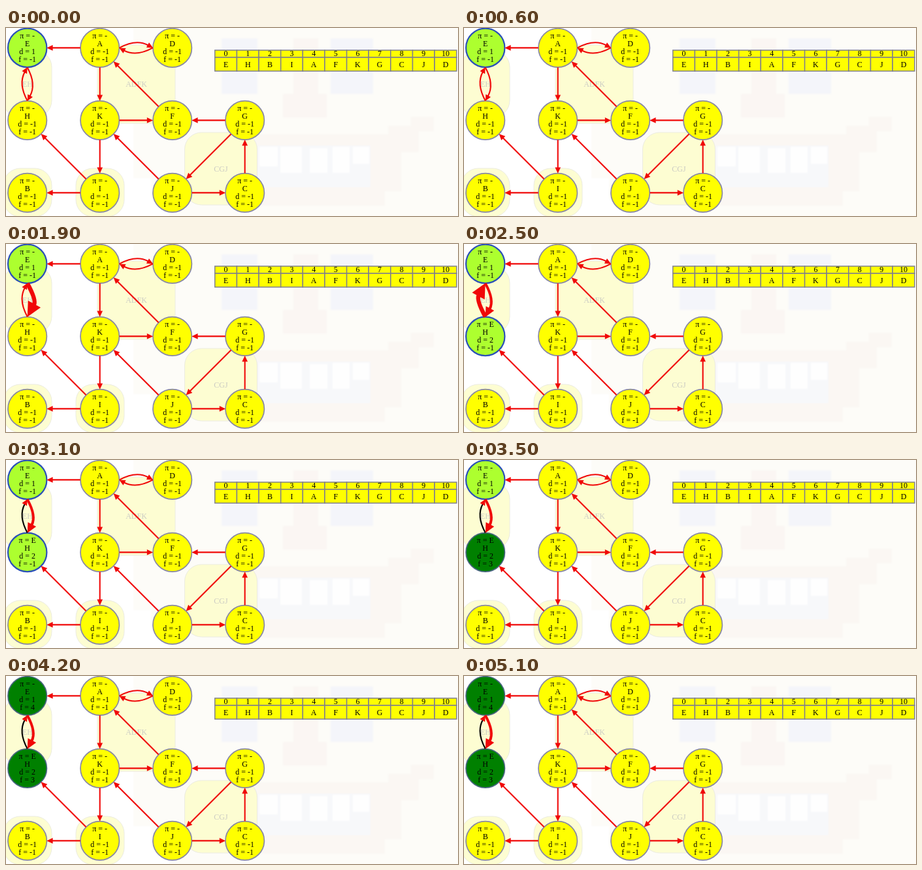
Recreate the animation shown at these times as an HTML page. Size 692 px wide and 288 px high, loop 5.2 s.

```html
<!DOCTYPE html>
<html lang="en">
<head>
<meta charset="utf-8">
<title>Depth-first search</title>
<style>
  html, body { margin: 0; width: 100%; height: 100%; overflow: hidden; background: #fff; }
  svg { display: block; width: 692px; height: 288px; }
  text { font: 12px "Liberation Serif", "Times New Roman", serif; text-anchor: middle; white-space: pre; }
  .group rect { fill: #fdfdd2; stroke: #ecece0; }
  .group text { fill: #ccccc4; }
  .node circle { fill: #ff0; stroke: #8888a4; stroke-width: 1.7; }
  .node.open circle { fill: #adff2f; stroke: #2b50b8; stroke-width: 2.2; }
  .node.done circle { fill: #008000; stroke: #48657f; }
  .edge { fill: none; stroke: #f00808; }
  .head { fill: #f00808; }
  .cell { fill: #ff0; stroke: #80808c; stroke-width: 1.5; }
</style>
</head>
<body>
<svg id="stage" viewBox="0 0 692 288">
  <defs><filter id="soft"><feGaussianBlur stdDeviation="1.2"/></filter></defs>
  <g filter="url(#soft)">
    <path fill="#fdfcf8" d="M195 0H700V296H250V262H222V230H195Z"/>
    <path fill="#f4f5fa" d="M330 16H385V101H330ZM497 16H562V101H497Z"/>
    <path fill="#fbf6f3" d="M440 16H478V101H491V137H424V101H440Z"/>
    <path fill="#fbf7f3" d="M310 163H585V150H620V136H655V158H632V190H605V250H580V272H385V250H310Z"/>
    <path fill="#f7f8fa" d="M385 180H558V244H385Z"/>
    <path fill="#fefefe" d="M388 182H416V212H388ZM420 182H453V222H420ZM465 184H492V222H465ZM500 182H526V222H500ZM531 182H556V208H531Z"/>
  </g>
</svg>
<script>
const stage = document.getElementById('stage');

function add(tag, attrs, parent = stage, text = '') {
  const el = document.createElementNS('http://www.w3.org/2000/svg', tag);
  for (const key in attrs) el.setAttribute(key, attrs[key]);
  el.textContent = text;
  parent.appendChild(el);
  return el;
}

function addGroup(name, x, y, width, height) {
  const g = add('g', { class: 'group' });
  add('rect', { x, y, width, height, rx: 26 }, g);
  add('text', { x: x + width / 2, y: y + height / 2 + 4 }, g, name);
}

addGroup('EH', -4, 34, 74, 103);
addGroup('ADFK', 140, 26, 119, 120);
addGroup('CGJ', 273.5, 160, 111, 111);
addGroup('B', -4, 215, 74, 74);
addGroup('I', 107, 215, 74, 74);

const nodes = {};
['EAD', 'HKFG', 'BIJC'].forEach((row, r) => [...row].forEach((name, c) => {
  const x = 32.7 + c * 111, y = 30.4 + r * 111;
  const g = add('g', { class: 'node' });
  add('circle', { cx: x, cy: y, r: 29.7 }, g);
  const lines = [-14, -2, 10, 22].map(dy => add('text', { x, y: y + dy }, g));
  lines[1].textContent = name;
  nodes[name] = { x, y, g, lines };
}));

function setNode(name, state, parent, d, f) {
  const { g, lines } = nodes[name];
  g.setAttribute('class', 'node ' + state);
  lines[0].textContent = 'π = ' + parent;
  lines[2].textContent = 'd = ' + d;
  lines[3].textContent = 'f = ' + f;
}

// Returns a function that redraws the edge with a given width and colour.
function addEdge(from, to, bend = 0) {
  const a = nodes[from], b = nodes[to];
  const dist = Math.hypot(b.x - a.x, b.y - a.y);
  const ux = (b.x - a.x) / dist, uy = (b.y - a.y) / dist;
  const start = [a.x + ux * 30, a.y + uy * 30];
  const tip = [b.x - ux * 29.6, b.y - uy * 29.6];
  const ctrl = [(a.x + b.x) / 2 + uy * bend, (a.y + b.y) / 2 - ux * bend];
  const line = add('path', { class: 'edge' });
  const head = add('path', { class: 'head' });

  function draw(width, color = '#f00808') {
    const span = Math.hypot(tip[0] - ctrl[0], tip[1] - ctrl[1]);
    const vx = (tip[0] - ctrl[0]) / span, vy = (tip[1] - ctrl[1]) / span;
    const long = 3 * width + 3, half = 1.5 * width + 1.2;
    const bx = tip[0] - vx * long, by = tip[1] - vy * long;
    line.setAttribute('d', `M${start}Q${ctrl} ${bx + vx},${by + vy}`);
    line.style.strokeWidth = width;
    line.style.stroke = color;
    head.setAttribute('d', `M${tip}L${bx - vy * half},${by + vx * half} ${bx + vy * half},${by - vx * half}Z`);
  }
  draw(2.1);
  return draw;
}

'AE AK FA KF GF GJ CG JC JK KI IB IH'.split(' ').forEach(pair => addEdge(...pair));
addEdge('A', 'D', 14);
addEdge('D', 'A', 14);
const back = addEdge('H', 'E', 14);
const tree = addEdge('E', 'H', 14);

[...'EHBIAFKGCJD'].forEach((name, i) => {
  const width = 370 / 11, x = 319.8 + i * width;
  add('rect', { class: 'cell', x, y: 34, width, height: 11 });
  add('rect', { class: 'cell', x, y: 45, width, height: 21 });
  add('text', { x: x + width / 2, y: 43 }, stage, i);
  add('text', { x: x + width / 2, y: 59.6 }, stage, name);
});

for (const name in nodes) setNode(name, '', '-', -1, -1);

const ramp = (t, from, to) => Math.min(1, Math.max(0, (t - from) / (to - from)));

function render(t) {
  const eDone = t >= 3900, hOpen = t >= 2100, hDone = t >= 3200;
  setNode('E', eDone ? 'done' : 'open', '-', 1, eDone ? 4 : -1);
  setNode('H', hDone ? 'done' : hOpen ? 'open' : '', hOpen ? 'E' : '-', hOpen ? 2 : -1, hDone ? 3 : -1);
  tree(2.1 + 4.4 * ramp(t, 1300, 1700) - 2.5 * ramp(t, 1900, 2300));
  back(2.1 + 4.4 * ramp(t, 2200, 2500) - 4.4 * ramp(t, 2600, 2900), t >= 2900 ? '#000' : undefined);
}

function tick() {
  render(Math.floor(performance.now() % 5200 / 100) * 100);
  requestAnimationFrame(tick);
}
tick();
</script>
</body>
</html>
```
